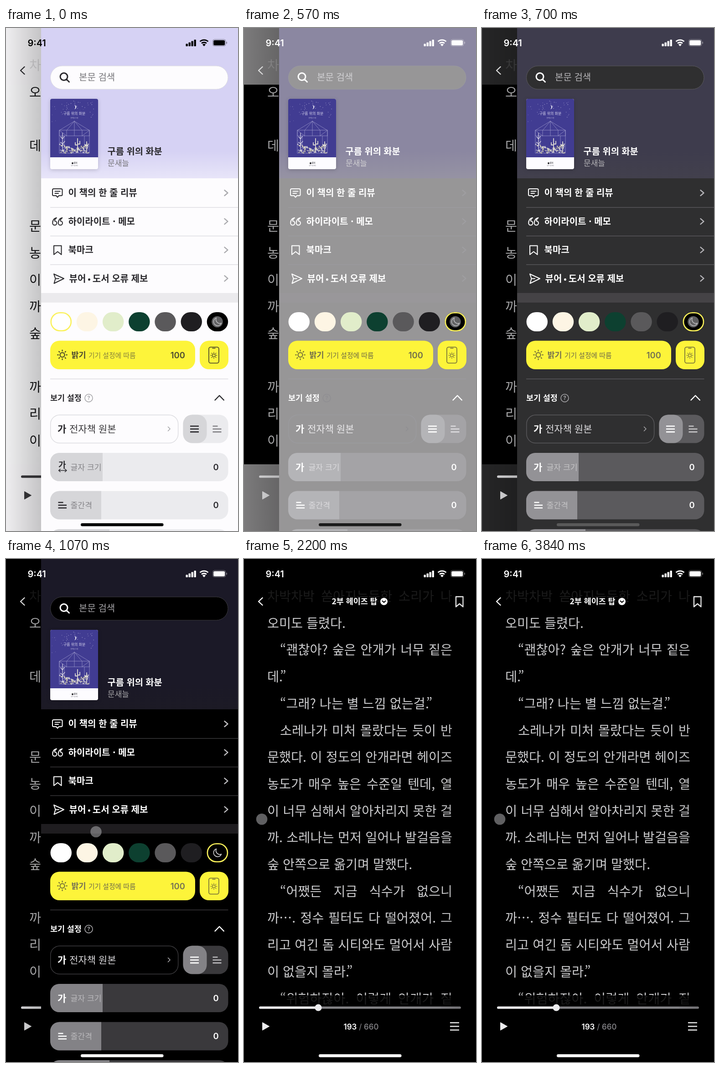
An HTML page that plays this animation: 509x1101 px, repeating every 3.88 s.

```html
<!DOCTYPE html>
<html lang="ko">
<head>
<meta charset="utf-8">
<title>Reader theme</title>
<style>
  html, body { margin: 0; width: 100%; height: 100%; overflow: hidden; background: #000; }
  #stage { position: relative; width: 509px; height: 1101px; overflow: hidden; background: var(--page); }
  #page div {
    position: absolute; left: 51px; width: 406px; box-sizing: border-box; white-space: nowrap;
    font: 300 28.3px/58px "Noto Sans CJK KR", "Noto Sans CJK", sans-serif; color: var(--read);
    text-align-last: justify;
  }
  #page .indent { padding-left: 28px; }
  #page .ragged { text-align-last: left; }
  #page span { margin-left: -6px; }
  svg { position: absolute; left: 0; top: 0; }
  text { font-family: "Noto Sans CJK KR", "Noto Sans CJK", sans-serif; }
  .num { font-family: Inter, sans-serif; font-weight: 600; }
  .line { fill: none; stroke-linecap: round; stroke-linejoin: round; }
</style>
</head>
<body>
<div id="stage"><div id="page"></div></div>
<script>
const LOOP = 3880, SWITCH = 365;

// name: [before the switch, start of the fade, end of the fade]
const palette = {
  page: ['#fdfdfe', '#000000', '#000000'],
  read: ['#141416', '#cbcbcd', '#cbcbcd'],
  bg: ['#fdfcfe', '#fdfcfe', '#000000'],
  head: ['#d6d2f4', '#d6d2f4', '#1b1927'],
  melt: ['#fdfcfe', '#fdfcfe', '#1d1b23'],
  band: ['#ebeaed', '#ebeaed', '#1f1d20'],
  rule: ['#dcdce0', '#dcdce0', '#3c3b3e'],
  track: ['#ebebee', '#ebebee', '#3a393c'],
  level: ['#d6d6d9', '#d6d6d9', '#838286'],
  ink: ['#2b2a2e', '#ffffff', '#ffffff'],
  body: ['#3a393c', '#f4f3f5', '#d8d7da'],
  sub: ['#858488', '#f2f1f3', '#bab9bc'],
  hint: ['#77767a', '#eeedf0', '#a6a5a8'],
  arrow: ['#aaaaae', '#88878b', '#c0bfc2'],
  dim: ['#a0a0a4', '#747377', '#b8b7ba'],
  bar: ['#3a393c', '#e8e8ea', '#ececee'],
  sun: ['#3d3b28', '#6d6938', '#6d6938'],
  bright: ['#4c4a30', '#6d6a45', '#757154'],
  note: ['#85803c', '#6e6a3f', '#6e6a4a'],
};

const rgb = c => [1, 3, 5].map(i => parseInt(c.slice(i, i + 2), 16));
const mix = (a, b, k) => {
  const to = rgb(b);
  return `rgb(${rgb(a).map((v, i) => Math.round(v + (to[i] - v) * k))})`;
};
const ease = (t, start, length) =>
  (1 - Math.cos(Math.PI * Math.min(1, Math.max(0, (t - start) / length)))) / 2;

let seed = 7;
const random = () => (seed = seed * 16807 % 2147483647) / 2147483647;
const v = name => `var(--${name})`;
const paint = c => c[0] === '#' ? c : v(c);

const label = (x, y, size, weight, color, text, extra = '') =>
  `<text x="${x}" y="${y + size * .37}" font-size="${size}" font-weight="${weight}" fill="${paint(color)}" ${extra}>${text}</text>`;
const num = (x, y, size, color, text, extra = '') =>
  `<text class="num" x="${x}" y="${y + size * .363}" font-size="${size}" fill="${paint(color)}" ${extra}>${text}</text>`;
const box = (x, y, w, h, r, color, extra = '') =>
  `<rect x="${x}" y="${y}" width="${w}" height="${h}" rx="${r}" fill="${paint(color)}" ${extra}/>`;
const stroke = (d, color, width = 2, extra = '') =>
  `<path class="line" d="${d}" stroke="${paint(color)}" stroke-width="${width}" ${extra}/>`;
const dot = (x, y, r, color, extra = '') =>
  `<circle cx="${x}" cy="${y}" r="${r}" fill="${paint(color)}" ${extra}/>`;
const bars = (x, y, widths, gap, color, width = 2.6) =>
  stroke(widths.map((w, i) => `M${x} ${y + i * gap}h${w}`).join(''), color, width, 'style="stroke-linecap:butt"');

function sun(x, y, r, width) {
  let d = `M${x + r} ${y}a${r} ${r} 0 1 1 ${-2 * r} 0a${r} ${r} 0 1 1 ${2 * r} 0`;
  for (let i = 0; i < 8; i++) {
    const c = Math.cos(i * Math.PI / 4) * r, s = Math.sin(i * Math.PI / 4) * r;
    d += `M${x + c * 1.7} ${y + s * 1.7}L${x + c * 2.1} ${y + s * 2.1}`;
  }
  return stroke(d, 'sun', width);
}

function slider(y, end) {
  return box(97, y, 390.5, 62, 20, 'track') +
    `<path d="M${end} ${y}H117a20 20 0 0 0-20 20v22a20 20 0 0 0 20 20H${end}z" fill="${v('level')}"/>`;
}

function cover() {
  let art = box(97, 155, 105, 154, 4, '#fdfcff', 'filter="drop-shadow(0 2px 4px rgba(0,0,0,.16))"') +
    '<path d="M97 283V159a4 4 0 0 1 4-4h97a4 4 0 0 1 4 4V283z" fill="#413c92"/>';
  for (let i = 0; i < 44; i++) {
    const x = 101 + random() * 97, depth = 12 + Math.abs(x - 150) * .75;
    art += dot(x, 160 + random() * depth, .4 + random() * .4, '#c9c6e6', 'opacity=".75"');
  }
  art += '<path d="M150 169a4.2 4.2 0 0 1 0 8.4a5 5 0 0 0 0-8.4" fill="#efeef8"/>' +
    label(150, 187, 8, 400, '#d9d6ee', '구름 위의 화분', 'text-anchor="middle"') +
    label(150, 196.5, 3.4, 400, '#cbc8e6', '문새늘 소설', 'text-anchor="middle"');
  let frame = 'M117 224V274H183V224zM117 236H183';
  for (const x of [117, 133, 150, 167, 183]) frame += `M150 204L${x} 224V236`;
  frame += 'M128 236V274M172 236V274M117 224L133 236M183 224L167 236';
  art += stroke(frame, '#a5a1d2', .7);
  for (let i = 0; i < 140; i++) {
    const x = 118 + random() * 64, side = Math.abs(x - 150) / 32;
    art += dot(x, 274 - random() * (9 + side * 14), .5 + random() * 1.3, i % 3 ? '#d8d6dc' : '#e2dca6', 'opacity=".8"');
  }
  art += stroke('M124 270V230M120 238l4 5 4-6M120 250l4 4 5-6', '#d5d2e4', 1.3) +
    stroke('M157 272V242M152 251v5h5M162 248v6h-5M177 271V249M173 255l4 4 4-5', '#dcd8d2', 1.8);
  return art + dot(146, 296, 2, '#28272b') +
    label(149, 296, 4, 700, '#28272b', '달늬') + label(150, 301, 2.6, 400, '#55545a', '달무늬집 펴냄', 'text-anchor="middle"');
}

function drawer() {
  const rows = ['이 책의 한 줄 리뷰', '하이라이트 · 메모', '북마크',
    '뷰어<tspan dx="4" font-size="17">•</tspan><tspan dx="4">도서 오류 제보</tspan>'];
  const chips = ['#ffffff', '#fdf5e4', '#e1edca', '#0d4030', '#5a595b', '#1f1e21', '#000000'];
  let s = '<rect x="-13" y="0" width="90" height="1101" fill="url(#shade)"/>' +
    box(77, 0, 440, 1101, 0, 'bg') + box(77, 0, 440, 329, 0, 'head') +
    '<rect x="77" y="0" width="440" height="329" fill="url(#fade)"/>';

  s += box(97.5, 83, 389.5, 51, 25.5, 'bg', `stroke="${v('rule')}"`) +
    stroke('M135 106.5a8 8 0 1 1-16 0a8 8 0 1 1 16 0M133 112.5l5.5 5.5', 'ink', 3) +
    label(160, 108, 20, 400, 'hint', '본문 검색') + cover() +
    label(222.5, 270, 19.8, 700, 'ink', '구름 위의 화분') +
    label(223, 296, 17, 400, 'hint', '문새늘');

  rows.forEach((text, i) => {
    const y = 361 + i * 62.4;
    s += label(i === 3 ? 138.5 : 136.5, y, 20, 700, 'ink', text) +
      stroke(`M479.5 ${y - 6}l7 6l-7 6`, 'arrow', 2.4);
    if (i < 3) s += box(97, 392 + i * 62.6, 420, 1.4, 0, 'rule');
  });
  s += stroke('M104.5 352H121a2.5 2.5 0 0 1 2.5 2.5V364.5a2.5 2.5 0 0 1-2.5 2.5H116l-3 3.5l-3-3.5H104.5a2.5 2.5 0 0 1-2.5-2.5V354.5a2.5 2.5 0 0 1 2.5-2.5zM107.5 357.5H118.5M107.5 362H115', 'ink') +
    [0, 12.5].map(x => stroke('M111 415.5c-6 1-9 6-8.8 11.5a4.6 4.6 0 1 0 4.6-4.6c0-3 1.5-5 4.2-6.9', 'ink', 2, `transform="translate(${x})"`)).join('') +
    stroke('M105 476.5h16.5v19.5l-8.25-6.5l-8.25 6.5z', 'ink') +
    stroke('M105 538.5L127 548.5L105.5 559L108.5 548.5zM108.5 548.5H116', 'ink') +
    box(77, 580, 440, 21, 0, 'band');

  chips.forEach((color, i) => {
    s += box(97.5 + i * 57.2, 622, 46.5, 42, 21, color);
  });
  const ring = (x, shown) => box(x + 1.2, 623.2, 44.1, 39.6, 19.8, '#000000',
    `style="fill:none;stroke:#faf15a;stroke-width:2.6;opacity:${v(shown)}"`);
  s += ring(97.5, 'early') + ring(440.7, 'late') +
    stroke('M461.5 634.5a8.8 8.8 0 1 0 11 11.5a8.5 8.5 0 0 1-11-11.5z', '#cfcfd1', 1.7);

  s += box(97, 684.5, 318, 62.5, 20, '#fdf43a') + box(425, 684.5, 63, 62.5, 20, '#fdf43a') +
    sun(123.5, 715.5, 5, 2) + label(143.5, 716, 17.4, 700, 'bright', '밝기') +
    label(181, 716.5, 14.8, 400, 'note', '기기 설정에 따름') +
    num(393, 716, 18.5, 'bright', '100', 'text-anchor="end"') +
    stroke('M449 698.5h14a4 4 0 0 1 4 4v27a4 4 0 0 1-4 4h-14a4 4 0 0 1-4-4v-27a4 4 0 0 1 4-4M453 701h6', 'sun', 1.6) +
    sun(456, 716.5, 3.2, 1.3) + box(97, 767.5, 390.5, 1.4, 0, 'rule');

  s += label(97, 810, 17.4, 700, 'ink', '보기 설정') +
    `<circle cx="181.5" cy="810" r="8.5" fill="none" stroke="${v('dim')}" stroke-width="1.5"/>` +
    num(181.5, 810, 12, 'dim', '?', 'text-anchor="middle"') +
    stroke('M458.5 814.5l9.7-10l9.7 10', 'ink', 2.4) +
    box(97.7, 847, 280, 61.5, 20, 'bg', `stroke="${v('rule')}" stroke-width="1.4"`) +
    label(113, 877.5, 21, 700, 'ink', '가') + label(139, 877.5, 21, 400, 'body', '전자책 원본') +
    stroke('M355.5 873l4.5 4.5l-4.5 4.5', 'dim', 1.5) +
    box(388.5, 846.5, 99, 62, 20, 'track') + box(388.5, 846.5, 52, 62, 20, 'level') +
    bars(404, 871.5, [19, 19, 19], 6.3, 'ink') + bars(453.5, 871.5, [11, 19, 19], 6.3, 'sub');

  s += slider(930, 212) + slider(1013.5, 209) + slider(1097, 227) +
    `<g opacity="${v('early')}">${label(115, 956, 18, 700, 'ink', '가')}${stroke('M116 968.5H132.5M119 965.5l-3.5 3l3.5 3M129.5 965.5l3.5 3l-3.5 3', 'ink', 1.6)}</g>` +
    `<g opacity="${v('late')}">${label(113, 961, 21, 700, 'ink', '가')}</g>` +
    label(141.5, 961.5, 17.2, 400, 'sub', '글자 크기') +
    bars(114.5, 1038.5, [11, 18.5, 18.5], 6, 'ink') + label(141.5, 1045, 17.2, 400, 'sub', '줄간격');
  for (const y of [961, 1044.5]) s += num(460.5, y, 18.5, 'ink', '0', 'text-anchor="middle"');
  return `<g id="drawer">${s}</g>`;
}

function chrome() {
  return box(0, 0, 509, 124, 0, 'bg', 'fill-opacity=".87"') + box(0, 955, 509, 146, 0, 'bg', 'fill-opacity=".87"') +
    stroke('M40.5 85l-8.5 8l8.5 8', 'ink', 2.4) +
    label(192.5, 93, 17.4, 700, 'ink', '2부 헤이즈 탑') + dot(307, 93, 8, 'ink') +
    stroke('M303.5 91.7l3.5 3.3l3.5-3.3', 'bg', 2) +
    stroke('M465 82.5h15.5v22l-7.75-6.5l-7.75 6.5z', 'ink', 2.4) +
    box(33, 979.5, 443, 5, 2.5, '#838286') + box(33, 979.5, 132, 5, 2.5, 'bar') + dot(163, 982, 7.6, 'bar') +
    `<path d="M40.5 1014.5L55.5 1023L40.5 1031.5z" fill="${v('bar')}" stroke="${v('bar')}" stroke-linejoin="round"/>` +
    num(218.5, 1023.5, 17, 'ink', '193<tspan fill="#88878b" font-weight="400"> / </tspan><tspan fill="#88878b" font-weight="500">660</tspan>') +
    bars(452, 1015, [20, 20, 20], 8, 'ink', 2.4);
}

function status() {
  const color = 'status';
  let s = num(47.5, 33, 20, color, '9:41');
  for (let i = 0; i < 4; i++) s += box(394.5 + i * 6, 34.5 - i * 3, 4.4, 5.5 + i * 3, 1, color);
  return s + stroke('M425.5 29.5a13.5 13.5 0 0 1 18 0M429 33.5a8.5 8.5 0 0 1 11 0', color, 2.8, 'style="stroke-linecap:butt"') +
    `<path d="M431 36.2a5 5 0 0 1 7 0l-3.5 3.8z" fill="${v(color)}"/>` +
    `<rect x="453.5" y="25" width="28.5" height="14.5" rx="4" fill="none" stroke="${v(color)}" stroke-opacity=".4"/>` +
    box(455.2, 26.7, 25, 11.2, 2.6, color) + box(483.4, 30, 1.6, 4.6, .8, color, 'opacity=".45"');
}

// ">" indents a line, "|" leaves it ragged
const lines = ['차박차박 쏟아지는듯한 소리가 나', '오미도 들렸다.|', '>“괜찮아? 숲은 안개가 너무 짙은', '데.”|',
  '>“그래? 나는 별 느낌 없는걸.”|', '>소레나가 미처 몰랐다는 듯이 반', '문했다. 이 정도의 안개라면 헤이즈',
  '농도가 매우 높은 수준일 텐데, 열', '이 너무 심해서 알아차리지 못한 걸', '까. 소레나는 먼저 일어나 발걸음을',
  '숲 안쪽으로 옮기며 말했다.|', '>“어쨌든 지금 식수가 없으니', '까⋯. 정수 필터도 다 떨어졌어. 그',
  '리고 여긴 돔 시티와도 멀어서 사람', '이 없을지 몰라.”|', '>“위험하잖아. 이렇게 안개가 짙'];

function pageLine(text, i) {
  const style = (text[0] === '>' ? 'indent ' : '') + (text.endsWith('|') ? 'ragged' : '');
  const words = text.replace(/[>|]/g, '').replace('”', '<span>”</span>');
  return `<div class="${style}" style="top:${51 + i * 58.7}px">${words}</div>`;
}

const stage = document.getElementById('stage');
document.getElementById('page').innerHTML = lines.map(pageLine).join('');
stage.insertAdjacentHTML('beforeend', `<svg width="509" height="1101" viewBox="0 0 509 1101">
  <defs>
    <linearGradient id="shade"><stop offset="0" stop-opacity=".03"/><stop offset="1" stop-opacity=".22"/></linearGradient>
    <linearGradient id="fade" x2="0" y2="1">
      <stop offset=".82" style="stop-color:var(--melt);stop-opacity:0"/><stop offset="1" style="stop-color:var(--melt);stop-opacity:.45"/>
    </linearGradient>
  </defs>
  ${chrome()}${drawer()}${status()}${box(164, 1084, 181.5, 6.5, 3.2, 'home')}
  <circle id="touch" r="12.3" fill="#a0a0a3" fill-opacity=".6"/></svg>`);

const panel = document.getElementById('drawer'), touch = document.getElementById('touch');
const set = (name, value) => stage.style.setProperty('--' + name, value);

function draw(t) {
  const late = t >= SWITCH, fade = ease(t, SWITCH, 470);
  for (const [name, [before, from, to]] of Object.entries(palette))
    set(name, late ? mix(from, to, fade) : before);
  set('early', late ? 0 : 1);
  set('late', late ? 1 : 0);
  set('status', mix('#000000', '#ffffff', ease(t, 370, 210)));
  set('home', mix('#000000', '#ffffff', ease(t, 430, 670)));
  panel.setAttribute('transform', `translate(${445 * ease(t, 1371, 206)})`);
  const move = ease(t, 850, 380);
  touch.setAttribute('cx', 463.5 - 424.5 * move);
  touch.setAttribute('cy', 643 - 73.5 * move);
}

const start = performance.now();
function tick() {
  draw((performance.now() - start) % LOOP);
  requestAnimationFrame(tick);
}
tick();
</script>
</body>
</html>
```
